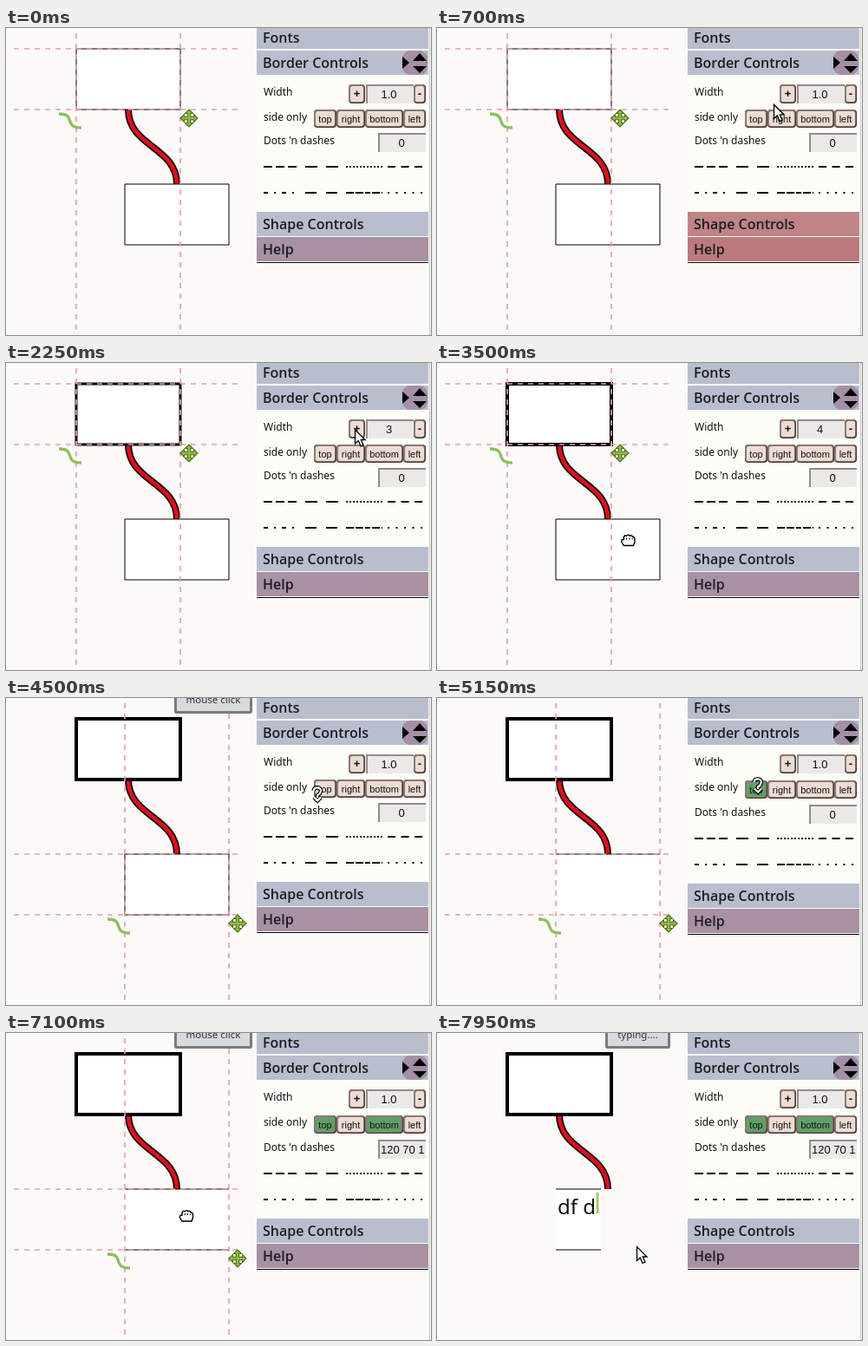
An HTML page for the animation above (8 s loop, 490 by 354 pixels).

```html
<!DOCTYPE html>
<html lang="en">
<head>
<meta charset="utf-8">
<title>Border controls</title>
<style>
html, body { margin: 0; width: 100%; height: 100%; overflow: hidden; background: #fbfaf9; }
svg { display: block; width: 490px; height: 354px; }
text { font: 12px "Noto Sans", "Open Sans", sans-serif; fill: #111; white-space: pre; }
.title { font-family: "Open Sans", "Noto Sans", sans-serif; font-size: 16px; font-weight: 600; fill: #1c1c20; }
.ui { font-family: "Liberation Sans", Arial, sans-serif; font-size: 11px; text-anchor: middle; }
.value { font-size: 13px; }
.sign { font-size: 13px; font-weight: bold; }
.big { font-size: 24px; }
.tip { font-size: 11.5px; text-anchor: middle; fill: #333; }
</style>
</head>
<body>
<svg id="stage" viewBox="0 0 490 354"></svg>
<script>
const LOOP = 8000;
const NS = 'http://www.w3.org/2000/svg';
const stage = document.getElementById('stage');

function set(node, attrs) {
  for (const k in attrs) node.setAttribute(k, attrs[k]);
  return node;
}
function add(parent, tag, attrs = {}, text) {
  const node = set(document.createElementNS(NS, tag), attrs);
  if (text !== undefined) node.textContent = text;
  return parent.appendChild(node);
}
const group = (parent = stage) => add(parent, 'g');
const rect = (p, x, y, width, height, fill, rx = 0) => add(p, 'rect', { x, y, width, height, fill, rx });
const path = (p, d, stroke, width, fill = 'none') =>
  add(p, 'path', { d, stroke, 'stroke-width': width, fill });
const label = (p, x, y, text, cls = '') => add(p, 'text', { x, y, class: cls }, text);
const show = (node, on) => set(node, { visibility: on ? 'visible' : 'hidden' });
const shift = (node, x, y) => set(node, { transform: `translate(${x} ${y})` });

// Canvas shapes
const diagram = group();
const wire = 'M141 94C141 137 197 137 197 180';
path(diagram, wire, '#100', 8);
path(diagram, wire, '#dc101c', 4.6);
const boxA = add(diagram, 'rect', { x: 81, y: 24, width: 120, height: 70, fill: '#fff', stroke: '#000' });
const boxB = rect(diagram, 137, 180, 120, 70, '#fff');
const edgesB = path(diagram, '', '#000', 1);
const typed = label(diagram, 139, 209, '', 'big');
const caret = rect(diagram, 0, 184, 3, 24, '#a3ca66');

// Selection guides and handles
const selection = group();
const guides = path(selection, '', '#e8a0a8', 1.7);
set(guides, { 'stroke-dasharray': '6 6' });
const handles = group(selection);
path(handles, 'M61 99C82 99 65 115 87 115', '#93bd5c', 3.4);
const arm = 'M0-10L4.5-5.5H1.7V-1.7H5.5V-4.5L10 0L5.5 4.5V1.7H1.7V5.5H4.5L0 10' +
  'L-4.5 5.5H-1.7V1.7H-5.5V4.5L-10 0L-5.5-4.5V-1.7H-1.7V-5.5H-4.5Z';
shift(path(handles, arm, '#4f6b20', 1.1, '#8fbd3c'), 211, 104);

// Message badge
const badge = group();
const badgeBox = add(badge, 'rect', { x: 195.5, y: -20, height: 36.5, fill: '#d9dade', stroke: '#7b7b7d', 'stroke-width': 3, rx: 1 });
const badgeText = label(badge, 0, 6, '', 'tip');

// Side panel
const panel = group();
rect(panel, 289, 0, 199, 272, '#fdfdf8');
rect(panel, 488, 0, 1, 354, '#c4c4c4');

function header(p, y, h, base, name, text) {
  const bar = rect(p, 289, y, 198, h, base);
  label(p, 296, text, name, 'title');
  return bar;
}
function button(p, x, y, w, h, text, cls = '') {
  rect(p, x, y, w, h, '#4a3c3b', 4);
  rect(p, x, y, w - 1.2, h - 1.2, '#8b7873', 4);
  const face = rect(p, x + 2, y + 2, w - 4, h - 4, '#ecdcd2', 2.5);
  label(p, x + w / 2, y + h / 2 + 4, text, 'ui ' + cls);
  return face;
}
function field(p, x, y, w, h) {
  rect(p, x, y, w, h, '#ebe9e8');
  path(p, `M${x + 1} ${y + h}V${y + 1}H${x + w}`, '#918c8b', 2);
  return label(p, x + w / 2 - 1, y + h / 2 + 5, '', 'ui value');
}

header(panel, 0, 24, '#b8bece', 'Fonts', 17);
header(panel, 26, 28, '#b8bece', 'Border Controls', 46);
rect(panel, 457, 26, 29, 28, '#a58fa6', 9);
path(panel, 'M457 33L465 40L457 47ZM469 38L477 29L485 38ZM469 44H485L477 52Z', 'none', 0, '#000');

label(panel, 297, 78, 'Width');
const widthText = field(panel, 415, 65, 55, 22);
button(panel, 395, 65, 19, 22, '+', 'sign');
button(panel, 470, 65, 14, 22, '-', 'sign');

label(panel, 297, 107, 'side only');
const sides = group(panel);
const [top_, , bottom_] = [['top', 355, 26], ['right', 381, 33], ['bottom', 414, 44], ['left', 458, 26]]
  .map(([name, x, w]) => button(sides, x, 94, w, 21, name));

const lower = group(panel);
label(lower, 297, 134, "Dots 'n dashes");
const clip = add(add(stage, 'defs'), 'clipPath', { id: 'field' });
rect(clip, 431, 121, 52, 24);
const dashBox = group(lower);
const dashText = field(dashBox, 429, 121, 55, 22);
set(dashText, { 'clip-path': 'url(#field)' });

function sample(x, y, w, dash) {
  set(path(lower, `M${x} ${y}h${w}`, '#000', 2), { 'stroke-dasharray': dash });
}
sample(297, 160, 38, '10 4');
sample(345, 160, 38, '14 10');
sample(392, 160, 42, '2 2');
sample(440, 160, 40, '9 6.5');
sample(297, 190, 35, '5 7 2 7');
sample(345, 190, 37, '13 11');
sample(392, 190, 42, '9 2 9 2 6 2');
sample(440, 190, 40, '2 7.5');

const shapeBar = header(lower, 212, 28, '', 'Shape Controls', 232);
const helpBar = header(lower, 241, 28, '', 'Help', 261);
rect(lower, 289, 269, 198, 1, '#fbfaf9');
rect(lower, 289, 270, 198, 1, '#000');

// Pointers, each drawn around its hot spot
const pointer = group();
const pointers = { arrow: group(pointer), hand: group(pointer), ask: group(pointer) };
path(pointers.arrow, 'M.5 .5V16.5L4.3 13L7 19.5L10 18.2L7.3 12H12Z', '#000', 1.3, '#fff');
path(pointers.hand, 'M-5 6L-7.5 2Q-8.5-1-5-1V-4Q-4-6.5-1.8-5.2Q0-7.5 2-5.3Q4.5-6.5 5-4Q7.5-4.5 7.5-1.5V2L6 6Z',
  '#000', 1.4, '#fff');
path(pointers.hand, 'M-1.8-3V-1M1.6-3V-1M4.7-2.5V-1', '#000', 1);
const query = 'M-4.5-4Q-4-8 .5-7.5Q5-6.5 3.5-2.5Q2.5 0 0 1.5V4M-4 3.5L0 7.5L4 3.5';
path(pointers.ask, query, '#000', 4.6);
path(pointers.ask, query, '#fff', 2.2);

// Pointer route: time, x, y
const route = [
  [400, 374, 303], [500, 379, 240], [600, 384, 150], [700, 388, 88], [850, 391, 78], [1000, 394, 73],
  [1150, 394, 73], [1200, 398, 74], [1300, 398, 74], [1350, 402, 76],
  [3100, 402, 77], [3350, 225, 201], [3450, 225, 201], [3550, 216, 208],
  [4100, 216, 208], [4500, 359, 111], [4600, 370, 101],
  [5300, 370, 101], [5700, 437, 97], [6050, 437, 97], [6300, 448, 105],
  [6600, 448, 105], [6900, 208, 211], [7400, 208, 211], [7600, 230, 246]
];
// Latest entry whose time has come
const at = (list, t) => list.reduce((v, [start, value]) => t >= start ? value : v, list[0][1]);
const kinds = [[0, ''], [400, 'arrow'], [3300, 'hand'], [4250, 'arrow'], [4450, 'ask'], [6680, 'arrow'],
  [6820, 'hand'], [7500, 'arrow']];
const widthsA = [[0, 1], [1550, 2], [2000, 3], [2500, 4]];
const messages = [[0, ''], [3750, 'mouse click'], [4750, ''], [7100, 'mouse click'], [7500, ''], [7850, 'typing....']];
const words = [[0, ''], [7650, 'd'], [7850, 'df'], [7950, 'df d']];

function along(t) {
  const i = route.findIndex(p => p[0] > t);
  if (i === 0) return route[0].slice(1);
  if (i < 0) return route[route.length - 1].slice(1);
  const [t0, x0, y0] = route[i - 1], [t1, x1, y1] = route[i];
  const k = (t - t0) / (t1 - t0);
  return [x0 + (x1 - x0) * k, y0 + (y1 - y0) * k];
}
const clamp = v => Math.max(0, Math.min(1, v));
const mix = (a, b, k) => `rgb(${a.map((v, i) => Math.round(v + (b[i] - v) * k))})`;
const glow = (t, start) => clamp((t - start) / 60) * clamp((1000 - t) / 380);

function draw(t) {
  const second = t >= 3750, topOn = t >= 4950, bottomOn = t >= 6200, editing = t >= 7500;
  const widthA = at(widthsA, t);
  set(boxA, { 'stroke-width': widthA });

  const word = at(words, t);
  typed.textContent = word;
  const textWidth = word ? typed.getComputedTextLength() : 0;
  const w = word ? textWidth + 8 : 120;
  set(boxB, { width: w });
  set(edgesB, { d: !topOn ? 'M137 180h120v70h-120z' : `M137 180h${w}` + (bottomOn ? `M137 250h${w}` : '') });
  set(caret, { x: 139 + textWidth + 0.5 });
  show(caret, editing);

  const [dx, dy] = second ? [56, 156] : [0, 0];
  show(selection, !editing);
  set(guides, { d: `M${81 + dx} 6V354M${201 + dx} 6V354M9 ${24 + dy}H270M9 ${94 + dy}H270` });
  shift(handles, dx, dy);

  const message = at(messages, t);
  const wide = message === 'mouse click' ? 90 : 75;
  show(badge, message !== '');
  badgeText.textContent = message;
  set(badgeText, { x: 194 + wide / 2 });
  set(badgeBox, { width: wide - 3 });

  widthText.textContent = second || widthA === 1 ? '1.0' : widthA;
  set(top_, { fill: topOn ? '#60a066' : '#ecdcd2' });
  set(bottom_, { fill: bottomOn ? '#60a066' : '#ecdcd2' });
  shift(sides, 0, topOn ? 1 : 0);
  shift(lower, 0, topOn ? 2 : 0);
  dashText.textContent = bottomOn ? '120 70 120 70' : '0';
  set(dashText, { x: bottomOn ? 432 : 456, style: `text-anchor:${bottomOn ? 'start' : 'middle'}` });
  set(helpBar, { fill: mix([168, 145, 162], [193, 116, 114], glow(t, 420)) });
  set(shapeBar, { fill: mix([184, 190, 206], [193, 116, 114], glow(t, 480)) });

  const kind = at(kinds, t);
  for (const name in pointers) show(pointers[name], name === kind);
  shift(pointer, ...along(t));
}

const begin = performance.now();
function tick() {
  draw((performance.now() - begin) % LOOP);
  requestAnimationFrame(tick);
}
tick();
</script>
</body>
</html>
```
